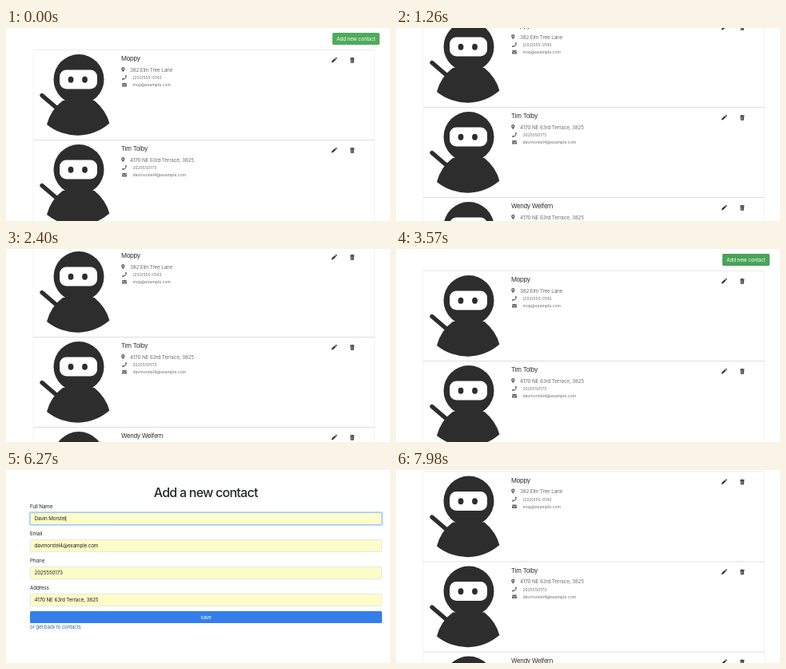
An HTML page that plays this animation: 480 px wide and 242 px high, repeating every 8 s.

```html
<!DOCTYPE html>
<html lang="en">
<head>
<meta charset="utf-8">
<title>Contact list</title>
<style>
  html, body { margin: 0; width: 100%; height: 100%; overflow: hidden; background: #fff; }
  svg { display: block; width: 480px; height: 242px; }
  text { font: 6.34px Inter, "Open Sans", sans-serif; letter-spacing: -.025em; fill: #6c6e70; white-space: pre; }
  .name { font-size: 7.7px; letter-spacing: -.035em; fill: #2b2d2f; }
  .small { font-size: 5.07px; letter-spacing: 0; }
  .title { font-size: 15.9px; font-weight: 500; letter-spacing: -.044em; fill: #212529; }
  .label { fill: #212529; }
  .button { fill: #fff; }
  .link { fill: #2c6cb5; letter-spacing: -.038em; }
  .mid { text-anchor: middle; }
  .icon { fill: #666; fill-rule: evenodd; }
  .action { fill: #303234; }
</style>
</head>
<body>
<svg viewBox="0 0 480 242">
  <defs>
    <g id="ninja" fill="#2d2d2d">
      <path d="M45 84.500L63 100" stroke="#2d2d2d" stroke-width="5.300" stroke-linecap="round"/>
      <path d="M51 121Q56 102 71 91H110.500Q125 103 129.300 119.500A60.500 60.500 0 0 1 51 121z"/>
      <circle cx="91" cy="64.500" r="31.500"/>
      <rect x="67" y="52.600" width="47" height="23.900" rx="8.500" fill="#fff"/>
      <ellipse cx="81" cy="64.800" rx="3.400" ry="4"/>
      <ellipse cx="98.500" cy="64.800" rx="3.400" ry="4"/>
    </g>
    <path id="pin" d="M0 3.100C-.8 1.600-2.200.6-2.200-1a2.200 2.200 0 0 1 4.400 0C2.200.6.8 1.600 0 3.100zM-.8-1a.8.8 0 1 0 1.600 0a.8.8 0 1 0-1.600 0z"/>
    <path id="phone" d="M2.900-2.600L1.400-3 .7-1.500l.9.8A5 5 0 0 1-.7 1.600l-.8-.9-1.500.7.4 1.500C.6 2.900 2.900.4 2.900-2.600z"/>
    <g id="mail">
      <rect x="-3" y="-2.300" width="6" height="4.600" rx=".6"/>
      <path d="M-3-1.300L0 .8 3-1.300" fill="none" stroke="#fff" stroke-width=".6"/>
    </g>
    <path id="pencil" d="M-3.200 3.200l.5-2.100L1-2.400 2.600-.8-1.100 2.800zM1.500-2.900l.6-.5q.4-.3.8 0l.8.8q.3.4 0 .8l-.6.5z"/>
    <g id="trash">
      <path d="M-2.800-2.900h1.600l.4-.5h1.600l.4.5h1.600v.8h-5.600zM-2.400-1.700h4.800l-.3 4.500q0 .6-.6.6h-3q-.6 0-.6-.6z"/>
      <path d="M-1.200-.9V2.600M0-.9V2.600M1.200-.9V2.600" stroke="#fff" stroke-width=".4"/>
    </g>
  </defs>
  <g id="list">
    <rect id="add" x="408" y="6" width="59" height="15" rx="1.600"/>
    <text class="button mid" x="437.500" y="15.900">Add new contact</text>
    <g id="cards"></g>
  </g>
  <g id="form">
    <text class="title mid" x="249.700" y="34.200">Add a new contact</text>
    <g id="fields"></g>
    <rect id="save" x="30" y="177" width="440" height="15" rx="1.600"/>
    <text class="button mid" x="250" y="186.700">save</text>
    <text class="link" x="30" y="198.800">or get back to contacts</text>
  </g>
</svg>
<script>
const LOOP = 8000;
const $ = id => document.getElementById(id);
const text = (x, y, s, cls = '') => `<text class="${cls}" x="${x}" y="${y}">${s}</text>`;
const icon = (id, x, y, cls = 'icon') => `<use href="#${id}" class="${cls}" transform="translate(${x} ${y})"/>`;

const address = '4170 NE 63rd Terrace, 3825', phone = '2025550173', email = 'davmorstel4@example.com';
const contacts = [
  ['Moppy', '382 Elm Tree Lane', '(202)555-0142', 'mop@example.com'],
  ['Tim Tolby', address, phone, email],
  ['Wendy Welfern', address, phone, email],
];
const fields = [
  ['Full Name', 'Full Name', 'Davin Morstel'],
  ['Email', 'Enter email', email],
  ['Phone', 'Enter phone', phone],
  ['Address', 'Enter address', address],
];

$('cards').innerHTML = contacts.map(([name, place, tel, mail], i) => `
  <g transform="translate(0 ${i * 113})">
    <path d="M34 27.500V140.500M460.500 27.500V140.500" stroke="#f4f4f4"/>
    <path d="M34 27.500H461" stroke="${i ? '#dedede' : '#ebebeb'}"/>
    <use href="#ninja"/>
    ${text(144, 41.2, name, 'name') + text(155, 54.6, place)}
    ${text(158.5, 64, tel, 'small') + text(158.5, 73.4, mail, 'small')}
    ${icon('pin', 146.3, 52.3) + icon('phone', 148, 62) + icon('mail', 148, 71.3)}
    ${icon('pencil', 410, 40.3, 'action') + icon('trash', 432.8, 40.3, 'action')}
  </g>`).join('');

$('fields').innerHTML = fields.map(([label], i) => `
  <g transform="translate(0 ${i * 34})">
    ${text(30, 47.6, label, 'label')}
    <rect class="box" x="30.250" y="53.500" width="439.500" height="15" rx="1.600" stroke="#d5dae0" stroke-width=".6"/>
    <text class="value" x="35.500" y="63.200"></text>
  </g>`).join('') + `
  <g id="ring" fill="none">
    <rect x="29.300" y="52.600" width="441.400" height="16.800" rx="2.200" stroke="#bfdcff" stroke-width="1.400"/>
    <rect x="30.250" y="53.500" width="439.500" height="15" rx="1.600" stroke="#80b8fa" stroke-width=".6"/>
  </g>
  <rect id="caret" y="57.800" width=".6" height="6.800" fill="#222"/>`;
const boxes = document.querySelectorAll('.box'), values = document.querySelectorAll('.value');

const ramp = (t, from, to) => Math.min(1, Math.max(0, (t - from) / (to - from)));
const mix = (a, b, k) => `rgb(${a.map((v, i) => Math.round(v + (b[i] - v) * k))})`;
// Value of the latest [time, value] pair that has been reached.
const step = (t, keys) => keys.reduce((v, [at, next]) => t >= at ? next : v, keys[0][1]);

const scrollSteps = [
  [0, 0], [450, 6], [570, 10], [660, 14],
  [1080, 18.5], [1110, 26], [1170, 33], [1215, 38], [1260, 41],
  [1830, 48], [1875, 57], [1920, 66], [1950, 71.5], [2010, 76],
  [2400, 30], [2490, 0],
];
const scroll = t => t < 7800 ? step(t, scrollSteps)
  : 25.5 * ((Math.min(5, Math.floor((t - 7800) / 36)) + 1) / 6) ** 1.6;

const addColours = [[0, '#4fab5b'], [3570, '#48a355'], [3600, '#3f914b'], [3780, '#3a8646'], [3990, '#3f914b']];

function drawForm(t) {
  const filled = t >= 5550, typed = t >= 5370;
  fields.forEach(([, hint, value], i) => {
    const started = filled || (typed && i === 0);
    values[i].textContent = filled ? value : started ? value[0] : hint;
    values[i].style.fill = started ? '#222' : '#6c757d';
    boxes[i].style.fill = filled ? '#fcfdc9' : '#fff';
  });
  $('ring').style.opacity = ramp(t, 4920, 5070) * (1 - ramp(t, 6540, 6660));
  const caretOn = (t >= 4920 && t < 5700) || (t >= 6210 && t < 6540);
  $('caret').style.opacity = +caretOn;
  $('caret').setAttribute('x', 35.5 + (typed ? values[0].getComputedTextLength() : 0));
  const save = $('save').style;
  save.fill = mix([61, 139, 249], [48, 119, 224], ramp(t, 6180, 6330));
  save.stroke = `rgba(150, 195, 255, ${ramp(t, 6540, 6660)})`;
}

function draw(now) {
  const t = now % LOOP, onForm = t >= 4140 && t < 6720;
  $('list').style.display = onForm ? 'none' : '';
  $('form').style.display = onForm ? '' : 'none';
  if (onForm) drawForm(t);
  else {
    $('list').setAttribute('transform', `translate(0 ${-scroll(t)})`);
    $('add').style.fill = t < 6720 ? step(t, addColours) : addColours[0][1];
  }
  requestAnimationFrame(draw);
}
requestAnimationFrame(draw);
</script>
</body>
</html>
```
